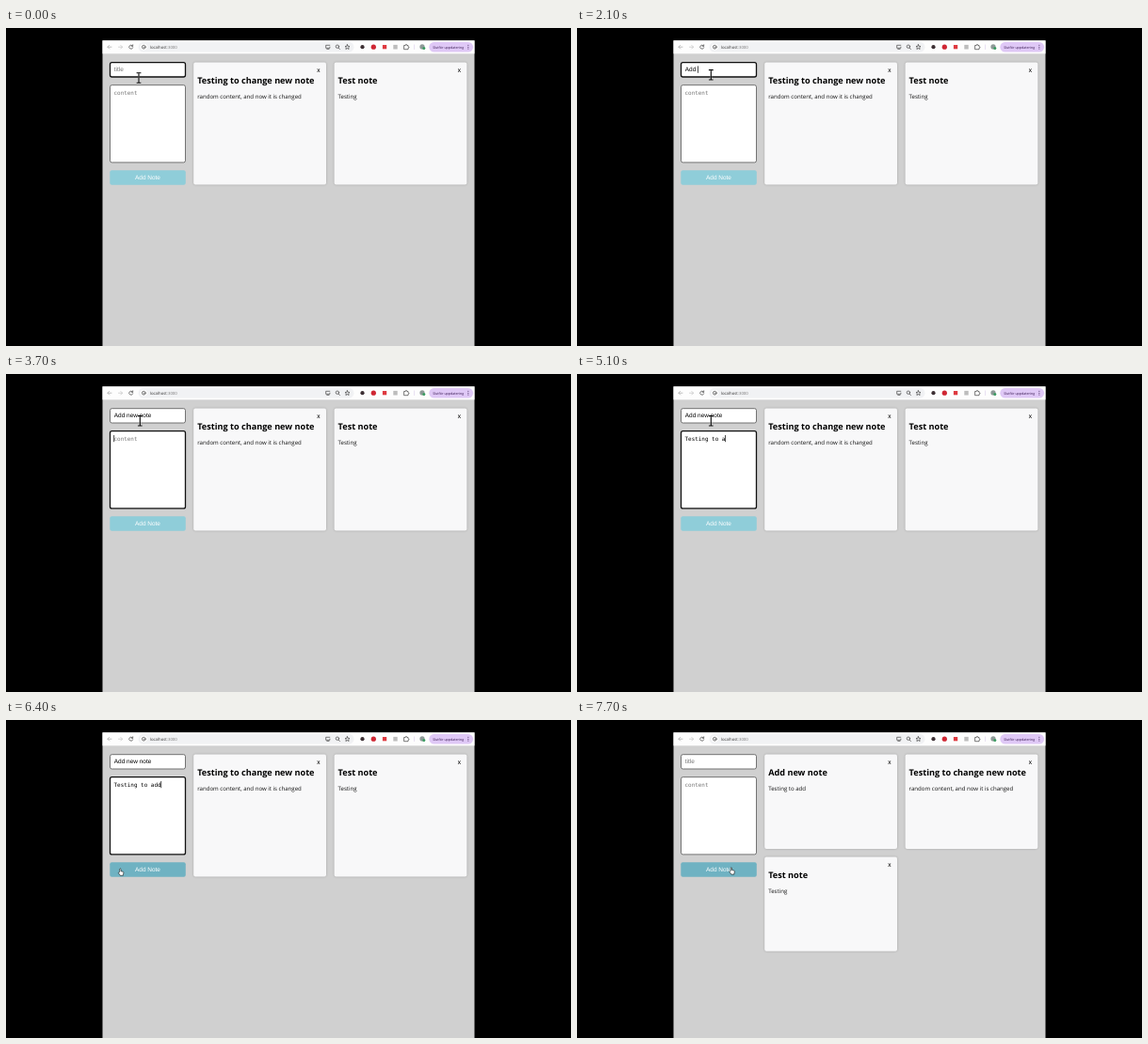
An HTML page for the animation above (8 s loop, 600x338 px).

```html
<!DOCTYPE html>
<html lang="en">
<head>
<meta charset="utf-8">
<title>Notes</title>
<style>
  html, body { margin: 0; width: 100%; height: 100%; overflow: hidden; background: #000; }
  svg { display: block; width: 600px; height: 338px; }
  text { white-space: pre; text-rendering: geometricPrecision; }
  .ui { font-family: "Open Sans", "Noto Sans", sans-serif; }
  .head { font-size: 9.13px; font-weight: 700; }
  .body { font-size: 6.1px; fill: #111; }
  .close { font-size: 5.2px; font-weight: 600; text-anchor: middle; }
  .field { font: 6.46px "Liberation Sans", Arial, sans-serif; }
  .mono { font: 5.95px "DejaVu Sans Mono", monospace; }
  .box { fill: #fff; }
  .card { fill: #f8f8f9; filter: drop-shadow(0 .6px 1.3px rgba(0, 0, 0, .22)); }
  .line { fill: none; stroke: #444; stroke-width: .7; stroke-linecap: round; stroke-linejoin: round; }
</style>
</head>
<body>
<svg viewBox="0 0 600 338">
  <rect width="600" height="338" fill="#000"/>
  <rect x="102.5" y="13.3" width="395" height="325" fill="#d0d0d0"/>

  <g id="toolbar">
    <rect x="102.5" y="13.3" width="395" height="14" fill="#fdfdfd"/>
    <rect x="140.5" y="15" width="229" height="10.4" rx="5.2" fill="#f1f2f4"/>
    <path class="line" style="stroke:#a5a5a5" d="M112 20.2h-4m1.7-1.8-1.8 1.8 1.8 1.8"/>
    <path class="line" style="stroke:#c2c2c2" d="M119.5 20.2h4m-1.7-1.8 1.8 1.8-1.8 1.8"/>
    <path class="line" d="M134.4 19a2 2 0 1 0 .3 1.8M134.7 17.8v1.5h-1.5"/>
    <circle cx="146.3" cy="20.2" r="3.4" fill="#fff"/>
    <circle class="line" cx="146.3" cy="20.2" r="1.9"/>
    <path class="line" d="M146.3 20.1v.9"/>
    <text class="ui" x="152.8" y="21.8" font-size="4.3" fill="#333">localhost<tspan fill="#777">:3000</tspan></text>
    <path class="line" d="M343.8 18.3h-4.1v3h4.2v-1.2M340.8 22.4h2.2"/>
    <path class="line" d="M353.2 21.2l1.3 1.3"/>
    <circle class="line" cx="351.9" cy="19.7" r="1.7"/>
    <path class="line" d="M362.5 17.7l.7 1.6 1.8.2-1.3 1.2.4 1.8-1.6-.9-1.6.9.4-1.8-1.3-1.2 1.8-.2z"/>
    <circle cx="378.5" cy="20.2" r="2.1" fill="#3d3034"/>
    <circle cx="390.3" cy="20.2" r="2.6" fill="#cf2633"/>
    <rect x="399.9" y="18" width="4.3" height="4.3" fill="#de3a40"/>
    <rect x="411.3" y="17.9" width="4.4" height="4.6" fill="#bdbdbd"/>
    <path class="line" d="M423 18.5h1.2c-.2-1.5 1.8-1.5 1.6 0h1.2v1.3c1.3-.1 1.3 1.7 0 1.6v1.3h-4z"/>
    <path d="M433.6 17.5v5.4" stroke="#d8c9e8" stroke-width=".6"/>
    <circle cx="442" cy="19.9" r="2.6" fill="#8f9a98"/>
    <circle cx="443.8" cy="21.5" r="1.5" fill="#3b9b62"/>
    <rect x="449.3" y="15" width="46.8" height="10.5" rx="5.2" fill="#dfc8f6"/>
    <text class="ui" x="453.2" y="21.5" font-size="3.62" font-weight="500" fill="#35164f">Slutför uppdatering</text>
    <g fill="#35164f">
      <circle cx="490.9" cy="18.3" r=".5"/><circle cx="490.9" cy="20.2" r=".5"/><circle cx="490.9" cy="22.1" r=".5"/>
    </g>
  </g>

  <rect id="titleBox" class="box" x="110.5" y="36.7" width="80" height="15.3" rx="2"/>
  <text id="titleText" class="field" x="114.8" y="46.4"></text>
  <rect id="bodyBox" class="box" x="110.5" y="60.7" width="80" height="82.2" rx="2"/>
  <text id="bodyText" class="mono" x="114.5" y="70.7"></text>
  <rect id="caret" width=".7" fill="#000"/>
  <rect id="button" x="110.3" y="151.3" width="80.5" height="15.5" rx="2"/>
  <text class="field" x="150.5" y="161.4" fill="#fff" text-anchor="middle">Add Note</text>

  <g id="before"></g>
  <g id="after"></g>

  <g id="beam" fill="none" stroke-linecap="butt">
    <path d="M-2.6-5.2H2.6M0-5.2V5.2M-2.6 5.2H2.6" stroke="#fff" stroke-opacity=".45" stroke-width="1.9"/>
    <path d="M-2.4-5.2H-.5L0-4.8.5-5.2H2.4M0-5V5M-2.4 5.2H-.5L0 4.8.5 5.2H2.4" stroke="#000" stroke-width="1.1"/>
  </g>
  <path id="arrow" d="M0-3.5V4l1.7-1.6L2.9 5l1.2-.5L3 2h2.4z" fill="#fff" stroke="#000" stroke-width=".6"/>
  <path id="hand" d="M-1.6 0V-3.2q.7-1 1.3 0V-.9l2.3.6q.7.2.6 1L2.1 2.9v.8H-1L-2.9 1q-.1-.9.7-.6z"
        fill="#fff" stroke="#111" stroke-width=".6" stroke-linejoin="round"/>
</svg>
<script>
const $ = id => document.getElementById(id);
const LOOP = 8000, STEP = 100;
const TAB = 3500, BLUR = 7100, ADDED = 7600;

const TITLE = "Add new note", BODY = "Testing to add";
// Time at which each character lands.
const titleKeys = [1600, 1800, 1900, 2100, 2300, 2400, 2500, 2600, 2700, 2800, 2900, 3000];
const bodyKeys = [4000, 4100, 4200, 4300, 4400, 4600, 4700, 4800, 4900, 5000, 5050, 5100, 5200, 5300];

// Pointer path: time, x, y
const path = [
  [0, 141, 53], [500, 142.3, 49.8], [5600, 142.3, 49.8], [5900, 138, 82],
  [6200, 126, 145], [6400, 122.3, 161.6], [6550, 122.3, 161.6], [7100, 164.8, 160.4], [LOOP, 164.8, 160.4]
];

function card(x, y, h, title, body) {
  return `<rect class="card" x="${x}" y="${y}" width="140.8" height="${h}" rx="2"/>
    <g class="ui">
      <text class="close" x="${x + 132.7}" y="${y + 10.1}">X</text>
      <text class="head" x="${x + 4}" y="${y + 22.6}">${title}</text>
      <text class="body" x="${x + 4}" y="${y + 38.4}">${body}</text>
    </g>`;
}

const changed = ["Testing to change new note", "random content, and now it is changed"];
const test = ["Test note", "Testing"];
const LEFT = 199.2, RIGHT = 348.6, TOP = 36.6;
$("before").innerHTML = card(LEFT, TOP, 130, ...changed) + card(RIGHT, TOP, 130, ...test);
$("after").innerHTML = card(LEFT, TOP, 100.3, TITLE, BODY) + card(RIGHT, TOP, 100.3, ...changed)
  + card(LEFT, TOP + 108.9, 100.3, ...test);

const typed = (keys, t) => keys.filter(k => k <= t).length;
const show = (el, on) => el.setAttribute("display", on ? "inline" : "none");

function setField(el, value, hint) {
  el.textContent = value || hint;
  el.setAttribute("fill", value ? "#000" : "#757575");
}

function setBorder(el, focused) {
  el.setAttribute("stroke", focused ? "#111" : "#555");
  el.setAttribute("stroke-width", focused ? 1.3 : .8);
}

function drawCaret(t, inTitle, value) {
  const keys = inTitle ? titleKeys : bodyKeys;
  const n = value.length;
  const last = n ? keys[n - 1] : inTitle ? -800 : TAB;
  show($("caret"), t < BLUR && Math.floor((t - last) / 500) % 2 === 0);
  const text = $(inTitle ? "titleText" : "bodyText");
  const x = +text.getAttribute("x") + (n ? text.getComputedTextLength() : 0);
  $("caret").setAttribute("x", x - .1);
  $("caret").setAttribute("y", inTitle ? 40.4 : 65);
  $("caret").setAttribute("height", inTitle ? 7.4 : 7.2);
}

function pointer(t) {
  const i = path.findIndex(p => p[0] > t);
  const [t0, x0, y0] = path[i - 1], [t1, x1, y1] = path[i];
  const k = (t - t0) / (t1 - t0);
  return [x0 + (x1 - x0) * k, y0 + (y1 - y0) * k];
}

function render(t) {
  const added = t >= ADDED;
  const title = added ? "" : TITLE.slice(0, typed(titleKeys, t));
  const body = added ? "" : BODY.slice(0, typed(bodyKeys, t));
  const inTitle = t < TAB;
  setField($("titleText"), title, "title");
  setField($("bodyText"), body, "content");
  setBorder($("titleBox"), inTitle);
  setBorder($("bodyBox"), !inTitle && t < BLUR);
  drawCaret(t, inTitle, inTitle ? title : body);
  show($("before"), !added);
  show($("after"), added);

  const [x, y] = pointer(t);
  const hover = y > 151;
  const kind = hover ? "hand" : y < 52 || y > 60 && y < 143 || t < 500 ? "beam" : "arrow";
  for (const id of ["beam", "arrow", "hand"]) {
    show($(id), id === kind);
    $(id).setAttribute("transform", `translate(${x} ${y})`);
  }
  $("button").setAttribute("fill", hover ? "#6fb2c2" : "#8fcdd9");
}

const start = performance.now();
function tick() {
  const t = (performance.now() - start) % LOOP;
  render(Math.floor(t / STEP) * STEP);
  requestAnimationFrame(tick);
}
tick();
</script>
</body>
</html>
```
